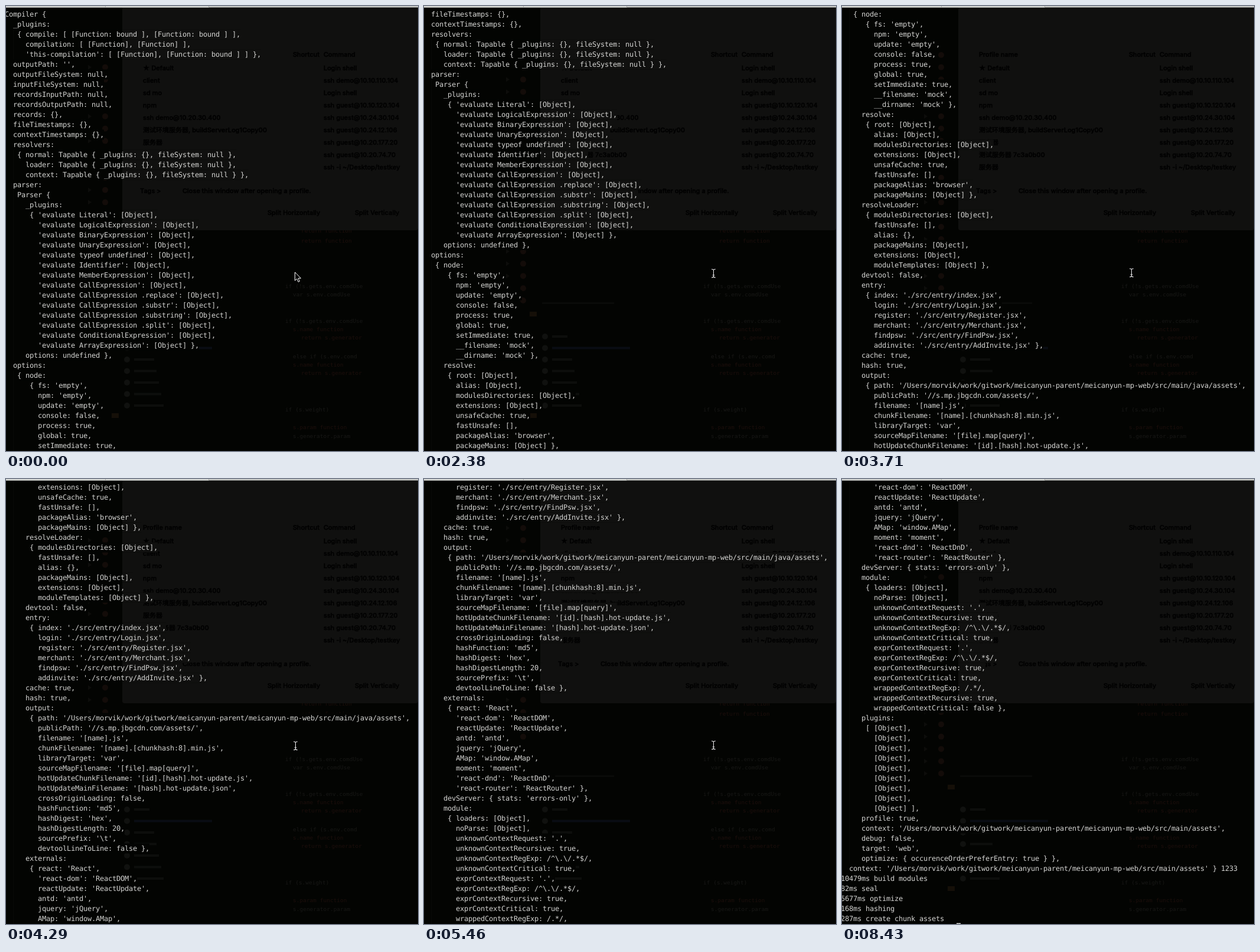
These frames come from a looping animation (698 by 754 pixels, 8.53 s). An HTML page:

```html
<!DOCTYPE html>
<html lang="en">
<head>
<meta charset="utf-8">
<title>Build log</title>
<style>
  html, body { margin: 0; width: 100%; height: 100%; overflow: hidden; background: #030402; }
  svg { display: block; }
  text { white-space: pre; }
  #rows text {
    font: 12px "DejaVu Sans Mono", monospace;
    letter-spacing: -.2246px;
    text-rendering: geometricPrecision;
    fill: #d4d4d2;
  }
  #dialog text { font: 500 11px Inter, sans-serif; fill: #000; stroke: #000; stroke-width: .5; }
  #code text { font: 9.5px "DejaVu Sans Mono", monospace; }
</style>
</head>
<body>
<svg id="stage" width="698" height="754" viewBox="0 0 698 754">
  <defs>
    <filter id="soft"><feGaussianBlur stdDeviation=".7"/></filter>
  </defs>
  <rect width="698" height="754" fill="#030402"/>
  <rect x="12" y="3" width="1" height="751" fill="#080907"/>
  <g id="tree" filter="url(#soft)"></g>
  <g id="code" filter="url(#soft)"></g>
  <rect x="197" y="-8" width="501" height="388" rx="4" fill="#10100f"/>
  <g id="dialog" filter="url(#soft)"></g>
  <g id="covers"></g>
  <g id="rows"></g>
  <rect id="prompt" x="194" y="752.5" width="7" height="1.5" fill="#d4d4d2"/>
  <rect width="698" height="2.5" fill="#c6c8c5"/>
  <rect width="343" height="2.5" fill="#d2d4d1"/>
  <rect id="tab" width="168" height="2" fill="#d2d4d1"/>
  <path d="M168.5 0V2M343.5 0V2.5" stroke="#a4a6a3"/>
  <path id="arrow" transform="translate(489.5 451)" d="M0 0V14.2L3.3 11.2L5.6 16.5L7.9 15.5L5.6 10.3H10Z" fill="#000" stroke="#fff" stroke-linejoin="round"/>
  <g id="beam" fill="none" stroke-linecap="round">
    <path d="M-3 -7Q0 -7 0 -5V5Q0 7 -3 7M3 -7Q0 -7 0 -5M0 5Q0 7 3 7M-1.5 3H1.5" stroke="#000" stroke-width="2.4"/>
    <path d="M-3 -7Q0 -7 0 -5V5Q0 7 -3 7M3 -7Q0 -7 0 -5M0 5Q0 7 3 7M-1.5 3H1.5" stroke="#e8e8e8" stroke-width="1.1"/>
  </g>
</svg>
<script>
const LOOP = 8530, VISIBLE = 44, PITCH = 17, CHAR = 7, LEFT = -2;
const PANEL = { x: 197, rows: 22 };

const log = String.raw`Compiler {
  _plugins:
   { compile: [ [Function: bound ], [Function: bound ] ],
     compilation: [ [Function], [Function] ],
     'this-compilation': [ [Function], [Function: bound ] ] },
  outputPath: '',
  outputFileSystem: null,
  inputFileSystem: null,
  recordsInputPath: null,
  recordsOutputPath: null,
  records: {},
  fileTimestamps: {},
  contextTimestamps: {},
  resolvers:
   { normal: Tapable { _plugins: {}, fileSystem: null },
     loader: Tapable { _plugins: {}, fileSystem: null },
     context: Tapable { _plugins: {}, fileSystem: null } },
  parser:
   Parser {
     _plugins:
      { 'evaluate Literal': [Object],
        'evaluate LogicalExpression': [Object],
        'evaluate BinaryExpression': [Object],
        'evaluate UnaryExpression': [Object],
        'evaluate typeof undefined': [Object],
        'evaluate Identifier': [Object],
        'evaluate MemberExpression': [Object],
        'evaluate CallExpression': [Object],
        'evaluate CallExpression .replace': [Object],
        'evaluate CallExpression .substr': [Object],
        'evaluate CallExpression .substring': [Object],
        'evaluate CallExpression .split': [Object],
        'evaluate ConditionalExpression': [Object],
        'evaluate ArrayExpression': [Object] },
     options: undefined },
  options:
   { node:
      { fs: 'empty',
        npm: 'empty',
        update: 'empty',
        console: false,
        process: true,
        global: true,
        setImmediate: true,
        __filename: 'mock',
        __dirname: 'mock' },
     resolve:
      { root: [Object],
        alias: [Object],
        modulesDirectories: [Object],
        extensions: [Object],
        unsafeCache: true,
        fastUnsafe: [],
        packageAlias: 'browser',
        packageMains: [Object] },
     resolveLoader:
      { modulesDirectories: [Object],
        fastUnsafe: [],
        alias: {},
        packageMains: [Object],
        extensions: [Object],
        moduleTemplates: [Object] },
     devtool: false,
     entry:
      { index: './src/entry/index.jsx',
        login: './src/entry/Login.jsx',
        register: './src/entry/Register.jsx',
        merchant: './src/entry/Merchant.jsx',
        findpsw: './src/entry/FindPsw.jsx',
        addinvite: './src/entry/AddInvite.jsx' },
     cache: true,
     hash: true,
     output:
      { path: '/Users/morvik/work/gitwork/meicanyun-parent/meicanyun-mp-web/src/main/java/assets',
        publicPath: '//s.mp.jbgcdn.com/assets/',
        filename: '[name].js',
        chunkFilename: '[name].[chunkhash:8].min.js',
        libraryTarget: 'var',
        sourceMapFilename: '[file].map[query]',
        hotUpdateChunkFilename: '[id].[hash].hot-update.js',
        hotUpdateMainFilename: '[hash].hot-update.json',
        crossOriginLoading: false,
        hashFunction: 'md5',
        hashDigest: 'hex',
        hashDigestLength: 20,
        sourcePrefix: '\t',
        devtoolLineToLine: false },
     externals:
      { react: 'React',
        'react-dom': 'ReactDOM',
        reactUpdate: 'ReactUpdate',
        antd: 'antd',
        jquery: 'jQuery',
        AMap: 'window.AMap',
        moment: 'moment',
        'react-dnd': 'ReactDnD',
        'react-router': 'ReactRouter' },
     devServer: { stats: 'errors-only' },
     module:
      { loaders: [Object],
        noParse: [Object],
        unknownContextRequest: '.',
        unknownContextRecursive: true,
        unknownContextRegExp: /^\.\/.*$/,
        unknownContextCritical: true,
        exprContextRequest: '.',
        exprContextRegExp: /^\.\/.*$/,
        exprContextRecursive: true,
        exprContextCritical: true,
        wrappedContextRegExp: /.*/,
        wrappedContextRecursive: true,
        wrappedContextCritical: false },
     plugins:
      [ [Object],
        [Object],
        [Object],
        [Object],
        [Object],
        [Object],
        [Object],
        [Object],
        [Object] ],
     profile: true,
     context: '/Users/morvik/work/gitwork/meicanyun-parent/meicanyun-mp-web/src/main/assets',
     debug: false,
     target: 'web',
     optimize: { occurenceOrderPreferEntry: true } },
  context: '/Users/morvik/work/gitwork/meicanyun-parent/meicanyun-mp-web/src/main/assets' } 1233
10479ms build modules
82ms seal
5677ms optimize
168ms hashing
287ms create chunk assets`.split("\n");

// [time, first visible line]
const scroll = [
  [0, 0], [1340, 1], [1490, 2], [1790, 3], [1940, 4], [2090, 6], [2230, 8],
  [2380, 11], [2520, 14], [2670, 18], [2820, 22], [2970, 26], [3120, 30],
  [3270, 33], [3410, 35], [3710, 36], [3850, 39], [4000, 43], [4150, 47],
  [4290, 50], [4440, 53], [4590, 56], [4740, 58], [4880, 59], [5030, 60],
  [5170, 62], [5320, 64], [5460, 66], [5610, 69], [5760, 72], [5900, 75],
  [6050, 78], [6200, 81], [6340, 84], [6490, 87], [6780, 89]
];
// [time, centre of the text pointer]
const beamY = [[0, 454], [1790, 453], [2970, 452], [4880, 451], [7380, 450]];

const $ = id => document.getElementById(id);
const at = (steps, t) => steps.findLast(s => s[0] <= t)[1];
const show = (el, on) => el.setAttribute("visibility", on ? "visible" : "hidden");

function add(parent, tag, attrs, content) {
  const el = document.createElementNS("http://www.w3.org/2000/svg", tag);
  for (const k in attrs) el.setAttribute(k, attrs[k]);
  if (content) el.textContent = content;
  return parent.appendChild(el);
}

// Faint windows behind the terminal
function drawBackdrop() {
  const dialog = $("dialog"), tree = $("tree"), code = $("code");
  const label = (x, y, s) => add(dialog, "text", { x, y }, s);
  label(232, 86, "Profile name");
  label(486, 86, "Shortcut");
  label(538, 86, "Command");
  const names = ["★ Default", "client", "sd mo", "npm", "ssh demo@10.20.30.400", "测试环境服务器, buildServerLog1Copy00", "服务器", "测试服务器 7c3a0b00", "服务器"];
  const commands = ["Login shell", "ssh demo@10.10.110.104", "Login shell", "ssh guest@10.10.120.104", "ssh guest@10.24.30.104", "ssh guest@10.24.12.106", "ssh guest@10.20.177.20", "ssh guest@10.20.74.70", "ssh -i ~/Desktop/testkey"];
  names.forEach((s, i) => {
    label(232, 109 + i * 21, s);
    label(538, 109 + i * 21, commands[i]);
  });
  label(227, 317, "Tags >");
  label(299, 317, "Close this window after opening a profile.");
  label(443, 354, "Split Horizontally");
  label(591, 354, "Split Vertically");

  for (let i = 0; i < 21; i++) {
    const y = 83 + i * 20.8;
    add(tree, "path", { d: `M139 ${y - 4}l6 4l-6 4z`, fill: "#0d0d0b" });
    add(tree, "circle", { cx: 168, cy: y, r: 5, fill: "#130c09" });
  }
  for (let i = 0; i < 7; i++) {
    const y = 560 + i * 19.5;
    add(tree, "circle", { cx: 205, cy: y, r: 5, fill: "#10110f" });
    add(tree, "rect", { x: 217, y: y - 2, width: i == 1 ? 132 : 26 + i * 4, height: 4, fill: i == 1 ? "#090c13" : "#0d0e0c" });
  }
  for (const y of [522, 694]) add(tree, "rect", { x: 179, y: y - 4, width: 12, height: 8, fill: "#150f08" });
  add(tree, "rect", { x: 200, y: 502, width: 122, height: 3, fill: "#0a0b09" });

  const lines = [
    [500, 384, "return function", 1], [500, 401, "return function", 1],
    [473, 478, "if (!s.gets.env.comdUse"], [486, 492, "var s.env.comdUse"],
    [473, 537, "if (!s.gets.env.comdUse"], [486, 551, "s.name function", 1], [500, 565, "return s.generator", 1],
    [486, 597, "else if (s.env.comd"], [486, 611, "s.name function", 1], [500, 625, "return s.generator", 1],
    [473, 687, "if (s.weight)"], [486, 717, "s.param function", 1], [486, 732, "s.generator.param"]
  ];
  for (const [x, y, s, warm] of lines) add(code, "text", { x, y, fill: warm ? "#1c0e0b" : "#171715" }, s);
}

const rows = [];
function buildRows() {
  for (let i = 0; i < VISIBLE; i++) {
    const y = 5.5 + i * PITCH;
    const back = add($("covers"), "rect", { y, height: PITCH, fill: "#030402" });
    const panel = i < PANEL.rows &&
      add($("covers"), "rect", { x: PANEL.x, y, height: PITCH, fill: "#10100f" });
    const text = add($("rows"), "text", { x: LEFT, y: 18 + i * PITCH });
    rows.push({ back, panel, text });
  }
}

let shownTop = -1;
function setTop(top) {
  if (top === shownTop) return;
  shownTop = top;
  rows.forEach((row, i) => {
    const line = log[top + i];
    const start = LEFT + line.search(/\S/) * CHAR, end = LEFT + line.length * CHAR;
    row.text.textContent = line;
    row.back.setAttribute("x", start);
    row.back.setAttribute("width", end - start);
    if (row.panel) row.panel.setAttribute("width", Math.max(0, end - PANEL.x));
  });
}

function render(t) {
  setTop(at(scroll, t));
  show($("prompt"), t >= 6780);
  show($("arrow"), t < 740);
  show($("beam"), t >= 740 && t < 7520);
  $("beam").setAttribute("transform", `translate(490.5 ${at(beamY, t)})`);
  $("tab").setAttribute("fill", t >= 740 && t < 8430 ? "#d2d4d1" : "#cccecb");
}

drawBackdrop();
buildRows();
const begin = performance.now();
function tick() {
  render((performance.now() - begin) % LOOP);
  requestAnimationFrame(tick);
}
tick();
</script>
</body>
</html>
```
